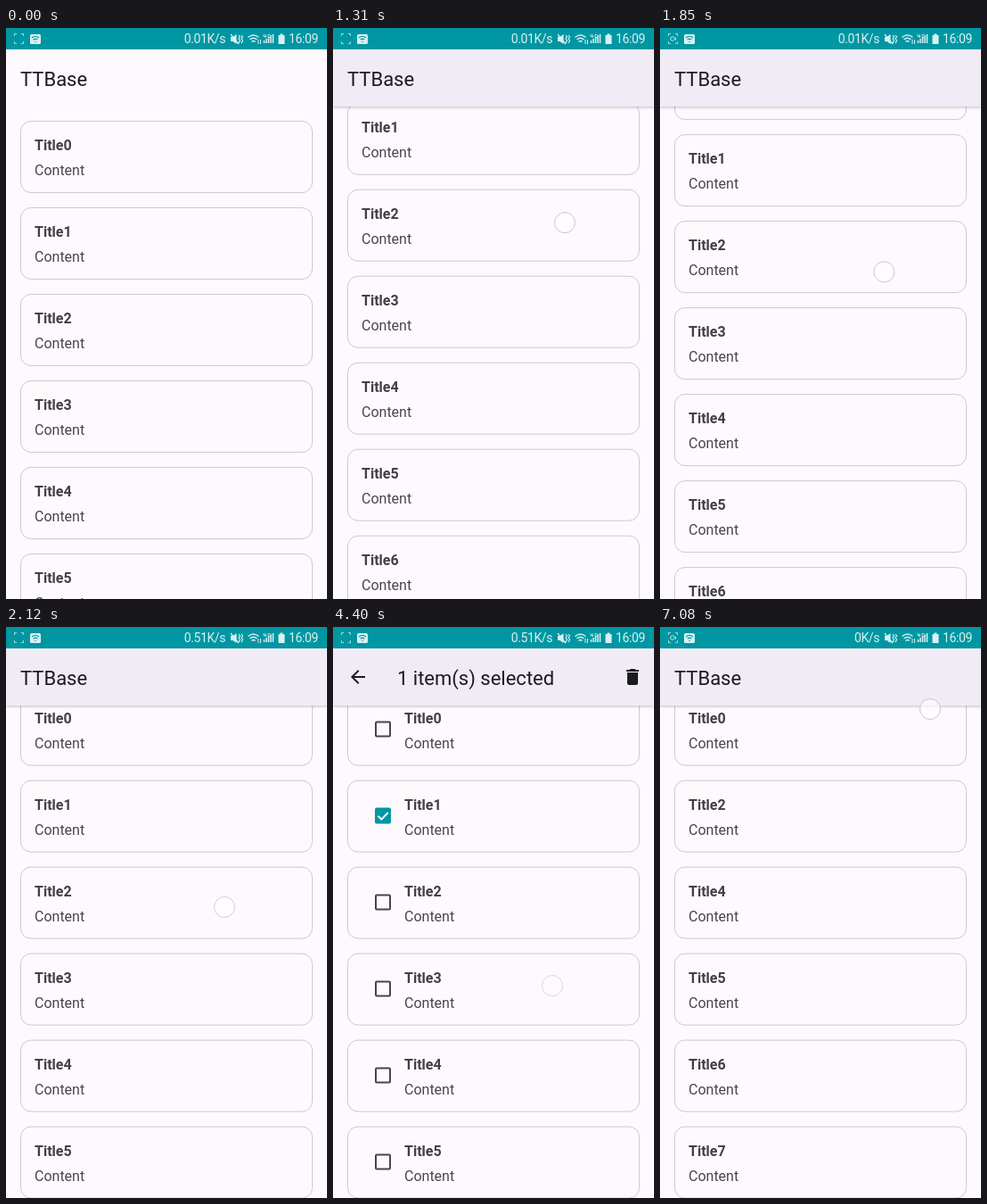
An HTML page for the animation above (7110 ms loop, 360x640 px).

```html
<!DOCTYPE html>
<html lang="en">
<head>
<meta charset="utf-8">
<title>List selection</title>
<style>
  html, body { margin: 0; width: 100%; height: 100%; overflow: hidden; background: #fdf9fd; }
  #stage { position: absolute; left: 0; top: 0; width: 360px; height: 640px; overflow: hidden;
    background: #fdf9fd; font-family: Roboto, "Noto Sans", sans-serif; }
  #stage div, #stage svg, #stage span { position: absolute; }
  #list { left: 0; top: 0; width: 360px; height: 640px; isolation: isolate; }
  .card { left: 16px; top: 0; width: 328px; height: 81px; box-sizing: border-box;
    border: 1px solid #cec8d3; border-radius: 12px; background: #fdf9fd; }
  .card span { left: 15px; font-size: 16px; line-height: 19px; color: #49454f; white-space: nowrap; }
  .card .title { top: 17px; font-weight: 700; color: #433f48; }
  .card .body { top: 45px; }
  .card svg { left: 27px; top: 27px; display: none; }
  .card.sel span { left: 63px; }
  .card.sel svg { display: block; }
  .card .on { display: none; }
  .card.checked .on { display: inline; }
  .card.checked .off { display: none; }
  #bar { left: 0; top: 24px; width: 360px; height: 64px; background: #f1ebf5;
    box-shadow: 0 1px 3px rgba(80, 70, 85, .35); }
  .head { left: 0; top: 0; width: 360px; height: 88px; color: #1c1b1f; }
  .head span { top: 45px; font-size: 22px; line-height: 25px; white-space: nowrap; }
  .head svg { top: 44px; fill: #1c1b1f; }
  #ripple { left: 317px; top: 37px; width: 38px; height: 38px; border-radius: 50%; background: #e6dbe9; }
  #status { left: 0; top: 0; width: 360px; height: 24px; background: #0096a2; color: #d8f0f2; }
  #status span { top: 4px; font-size: 14px; line-height: 17px; letter-spacing: -.4px; white-space: nowrap; }
  #touch { left: -12px; top: -12px; width: 24px; height: 24px; box-sizing: border-box; border-radius: 50%;
    border: 1.5px solid #cac5d2; background: rgba(255, 253, 255, .65); }
</style>
</head>
<body>
<div id="stage">
  <div id="list"></div>
  <div id="bar"></div>
  <div id="ripple"></div>
  <div id="home" class="head"><span style="left:16px">TTBase</span></div>
  <div id="pick" class="head">
    <svg style="left:16px" width="24" height="24"><path d="M20 11H7.83l5.59-5.59L12 4l-8 8 8 8 1.41-1.41L7.83 13H20z"/></svg>
    <span id="count" style="left:72px"></span>
    <svg style="left:324px" width="24" height="24"><path d="M6 19c0 1.1.9 2 2 2h8c1.1 0 2-.9 2-2V7H6zM19 4h-3.5l-1-1h-5l-1 1H5v2h14z"/></svg>
  </div>
  <div id="status">
    <svg width="360" height="24" fill="none" stroke="#d8f0f2">
      <path d="M9.500 9V6.500H12M17 6.500h2.500V9M19.500 15v2.500H17M12 17.500H9.500V15" opacity=".75"/>
      <g id="rec"><circle cx="14" cy="12" r="2.300"/><path d="M17.500 10.500v3"/></g>
      <rect x="27" y="7" width="12" height="11" rx="1.500" fill="#d8f0f2" stroke="none"/>
      <path d="M29 11q4-3.500 8 0M30.800 13.200q2.200-2 4.400 0M33 15v1" stroke="#0096a2" stroke-width="1.200"/>
      <path d="M252 10h2.500l4-3v11l-4-3H252z" fill="#d8f0f2" stroke="none"/>
      <path d="M252 7l9 11M261 8l1.500 2-1.500 2 1.500 2-1.500 3M264 8l1.500 2-1.500 2 1.500 2-1.500 3" stroke-width="1.200"/>
      <path d="M271.500 10.500q6-5 12 0M273.500 13q4-3.500 8 0M275.500 15.500q2-2 4 0" stroke-width="1.300"/>
      <path d="M283 13v5M285.500 18v-5"/>
      <path d="M289.500 17v-3M292 17v-5M294.500 17v-7M297 17V8M299.500 17V7" stroke-width="1.500"/>
      <path d="M289 7v2.500h3M291 7v4M296 7.500h-2v3h2" stroke-width=".8"/>
      <path d="M305.500 8h2V6.500h3V8h2v10h-7z" fill="#d8f0f2" stroke="none"/>
    </svg>
    <span id="speed" style="right:114px"></span>
    <span style="left:317px">16:09</span>
  </div>
  <div id="touch"></div>
</div>
<script>
const LOOP = 7110, PITCH = 97, FIRST = 104;
const SELECT = 3370, CHECK = 4530, REMOVE = 5955, MOVE = 5974;
const LAG = 65, GRIP = 343, BLINK = 1040;
const $ = id => document.getElementById(id);
const clamp = v => Math.max(0, Math.min(1, v));
const ramp = (t, start, len) => clamp((t - start) / len);
const smooth = p => (1 - Math.cos(Math.PI * p)) / 2;

// The dragging finger: up, a rest, further up, then down with growing speed
const fingerY = t => 351
  - 51 * smooth(ramp(t, 50, 240))
  - 89 * ramp(t, 640, 730)
  + 103 * ramp(t, 1370, 680) ** 1.45;
const fingerX = y => 260 - .156 * (y - 218);

// The list follows the finger a little late; the gap between start and grip is the touch slop
const scrollAt = t => Math.max(0, GRIP + .4 - fingerY(t - LAG));

function drag(t) {
  const y = fingerY(t);
  return [fingerX(y), y];
}
const glide = (x, y, dx, dy, start, len) => t => {
  const p = ramp(t, start, len);
  return [x + dx * p, y + dy * p];
};
const touches = [
  { down: 50, up: 2090, at: drag },
  { down: 2680, up: 4060, at: glide(264, 219, 0, 0, 0, 1) },
  { down: 4400, up: 4520, at: glide(246, 402, 3, 1, 4400, 120) },
  { down: 5240, up: 5780, at: glide(336, 56, 0, 0, 0, 1) },
  { down: 6850, up: LOOP, at: glide(323, 88, -20, 4, 6850, 230) }
];

const box = `<svg width="24" height="24" fill="none">
  <rect class="off" x="4" y="4" width="16" height="16" rx="1" stroke="#49454f" stroke-width="2"/>
  <g class="on"><rect x="3" y="3" width="18" height="18" rx="2" fill="#0096a2"/>
  <path d="M6.500 12.200l3.800 3.800 7.500-7.600" stroke="#fdf9fd" stroke-width="2"/></g></svg>`;

const cards = Array.from({ length: 9 }, (_, i) => {
  const el = document.createElement('div');
  el.className = 'card';
  el.innerHTML = `${box}<span class="title">Title${i}</span><span class="body">Content</span>`;
  const gone = i === 1 || i === 3;
  el.style.zIndex = gone ? 0 : 1;
  $('list').append(el);
  return { el, i, gone, up: (i > 1) + (i > 3) };
});

function drawCards(t) {
  const y = scrollAt(t);
  const moved = smooth(ramp(t, MOVE, 250));
  const left = 1 - smooth(ramp(t, REMOVE, 120));
  for (const { el, i, gone, up } of cards) {
    const shift = gone ? 0 : up * moved;
    el.style.transform = `translateY(${FIRST + PITCH * (i - shift) - y}px)`;
    el.style.opacity = gone ? left : 1;
    el.classList.toggle('sel', t >= SELECT && (gone || t < REMOVE));
    el.classList.toggle('checked', i === 1 || (i === 3 && t >= CHECK));
  }
}

function drawHead(t) {
  const pick = ramp(t, SELECT, 300) - ramp(t, REMOVE + 10, 300);
  $('bar').style.opacity = clamp(scrollAt(t) / 25);
  $('home').style.opacity = 1 - pick;
  $('pick').style.opacity = pick;
  $('count').textContent = `${t >= CHECK && t < REMOVE ? 2 : 1} item(s) selected`;
  $('ripple').style.opacity = .75 * (ramp(t, 5240, 240) - ramp(t, 6010, 370));
}

function drawStatus(t) {
  $('speed').textContent = t < 1990 ? '0.01K/s' : t < 4970 ? '0.51K/s' : '0K/s';
  $('rec').style.opacity = t % BLINK < BLINK / 2 ? 0 : .85;
}

function drawTouch(t) {
  const touch = touches.findLast(o => t >= o.down);
  const el = $('touch');
  el.style.opacity = touch ? (.7 + .3 * ramp(t, touch.down, 60)) * (1 - ramp(t, touch.up, 200)) : 0;
  if (!touch) return;
  const [x, y] = touch.at(t);
  el.style.transform = `translate(${x}px, ${y}px)`;
}

const start = performance.now();
function render() {
  const t = (performance.now() - start) % LOOP;
  drawCards(t);
  drawHead(t);
  drawStatus(t);
  drawTouch(t);
  requestAnimationFrame(render);
}
render();
</script>
</body>
</html>
```
